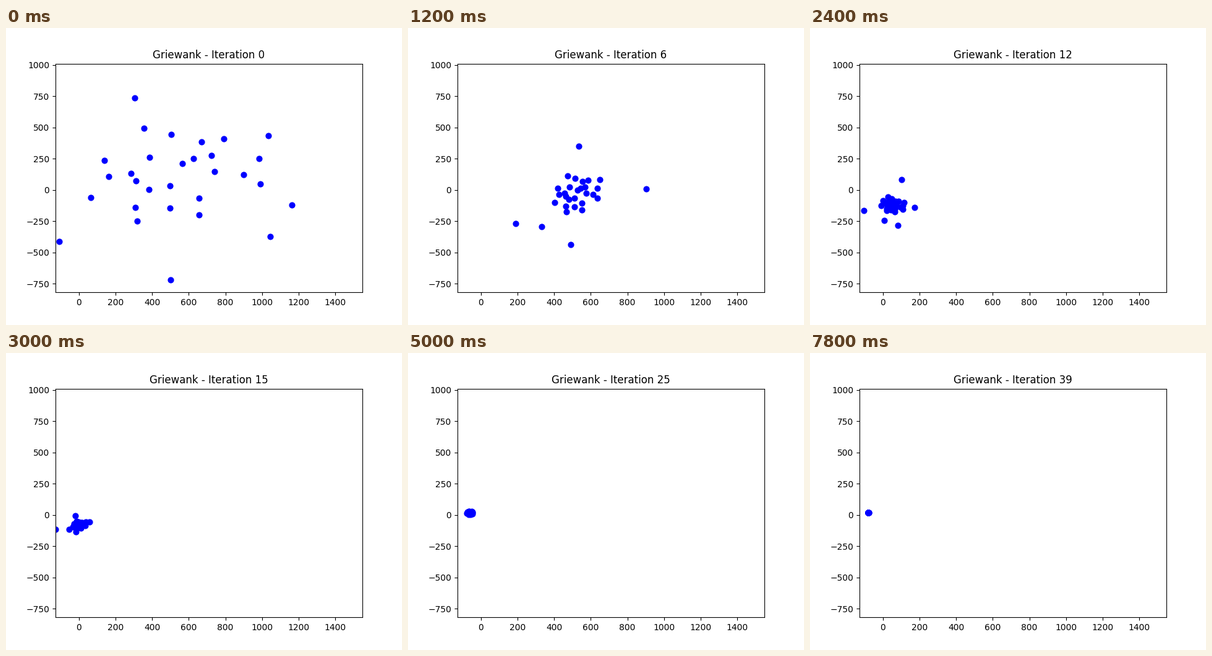
Write a matplotlib script that moves like this. It is 640 px wide and 480 px high and loops after 8 s.

```python
import numpy as np
import matplotlib.pyplot as plt
from matplotlib.animation import FuncAnimation

STEPS = 40
INTERVAL = 200
N = 30

# Evenly spread unit disc with some jitter, shared by all poses
rng = np.random.default_rng(4)
i = np.arange(N)
radius = ((i + 0.5) / N) ** 0.6
cloud = np.column_stack([radius * np.cos(2.4 * i), radius * np.sin(2.4 * i)])
cloud += np.clip(rng.normal(0, 0.08, cloud.shape), -0.15, 0.15)


def pose(center, spread, tilt=0, strays=None):
    """Swarm in a sheared ellipse, with every sixth particle straying."""
    p = cloud * spread
    p[:, 1] += tilt * p[:, 0]
    p += center
    if strays:
        p[::6] = strays
    return p


# iteration -> particle positions
poses = {
    0: pose((560, 140), (560, 420), 0.2,
            [(-108, -411), (304, 738), (501, -718), (1045, -371), (1163, -119)]),
    3: pose((950, 110), (180, 230), 0.6,
            [(460, -317), (592, -213), (805, -441), (852, 525), (1518, 238)]),
    9: pose((105, -160), (105, 95), -0.3,
            [(-78, -218), (68, -371), (179, -426), (220, 178), (291, -223)]),
    15: pose((2, -78), (40, 32), 0.2,
             [(-128, -114), (-54, -114), (-17, -134), (-20, -7), (57, -54)]),
    25: pose((-61, 18), (17, 14)),
    33: pose((-76, 17), (4, 4)),
    39: pose((-80, 20), (1, 1)),
}
keys = list(poses)


def positions(step):
    k = min(np.searchsorted(keys, step, side="right"), len(keys) - 1)
    a, b = keys[k - 1], keys[k]
    t = (step - a) / (b - a)
    if a >= 15:
        t = 1 - (1 - t) ** 2  # the swarm slows down as it settles
    return poses[a] + t * (poses[b] - poses[a])


fig, ax = plt.subplots(figsize=(6.4, 4.8), dpi=100)
dots = ax.scatter(*poses[0].T, s=40, color="blue")
title = ax.set_title("")
ax.set_xlim(-128.3, 1549)
ax.set_ylim(-818, 1011.7)


def update(step):
    dots.set_offsets(positions(step))
    title.set_text(f"Griewank - Iteration {step}")
    return dots, title


anim = FuncAnimation(fig, update, frames=STEPS, interval=INTERVAL, repeat=True)
plt.show()
```
